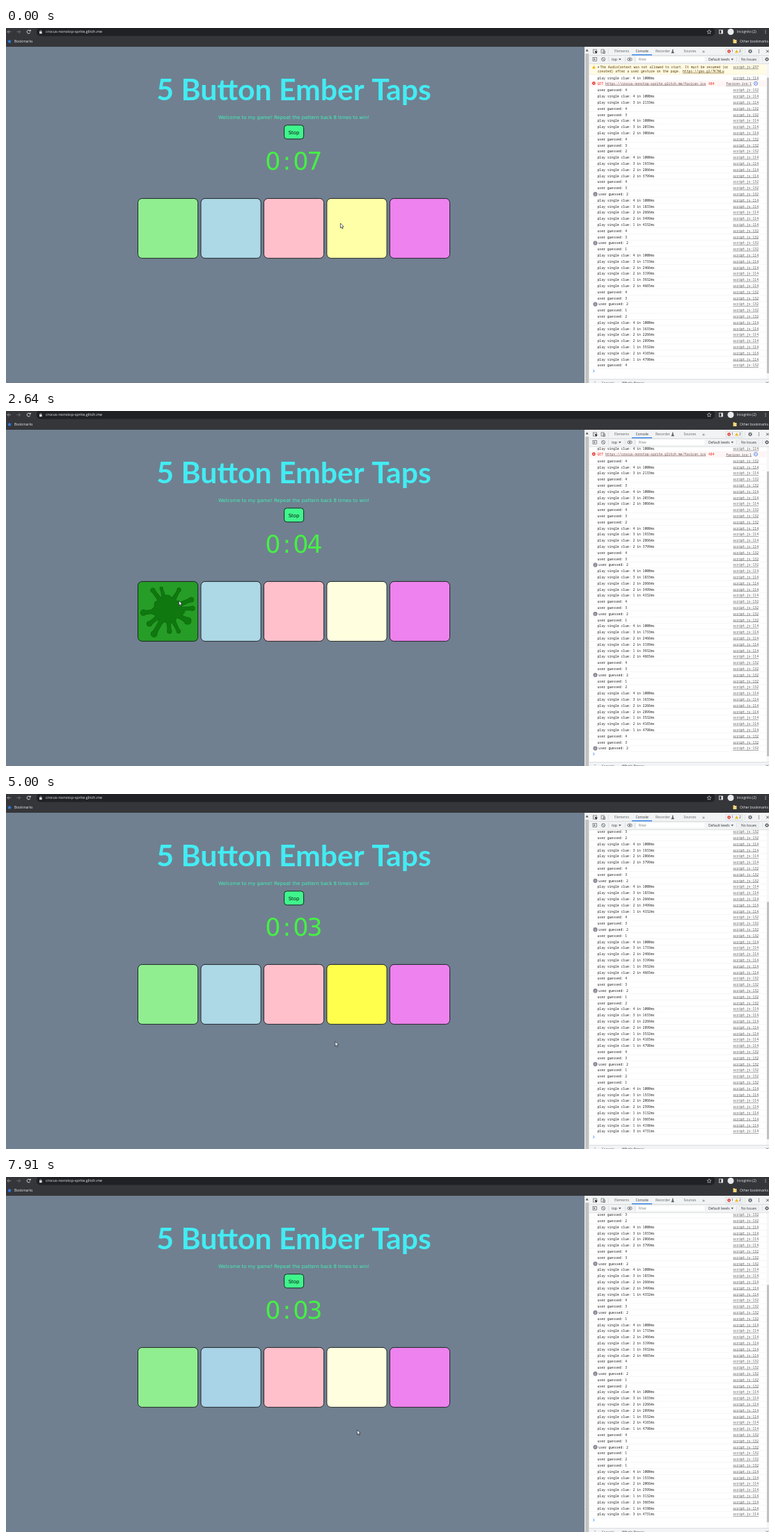
Animation, 1096 px wide and 511 px high, one loop 8000 ms. Source, as an HTML page with a canvas:

```html
<!DOCTYPE html>
<html lang="en">
<head>
<meta charset="utf-8">
<title>5 Button Ember Taps</title>
<style>
  html, body { margin: 0; width: 100%; height: 100%; overflow: hidden; background: #708090; }
  canvas { display: block; }
</style>
</head>
<body>
<canvas id="stage" width="1096" height="511"></canvas>
<script>
const ctx = document.getElementById('stage').getContext('2d');
const LOOP = 8000, FADE = 500, ROW = 8.8;
const UI = '"Open Sans", sans-serif';
const MONO = '"Noto Sans Mono", monospace';
const SANS = '"DejaVu Sans", sans-serif';
const GREY = '#5f6368', DARK = '#303134';

const rest = [[144, 238, 144], [173, 216, 230], [255, 192, 203], [255, 255, 224], [238, 130, 238]];
const lit = [[0, 128, 0], [0, 0, 255], [255, 0, 0], [255, 255, 0], [160, 0, 160]];
const pattern = [4, 3, 2, 2, 1, 2, 1, 3];

// button number, pressed at, released at
const presses = [[4, -420, -165], [3, 680, 865], [2, 1300, 1480], [2, 1800, 2010],
  [1, 2420, 2700], [2, 3020, 3210], [1, 3620, 3870]];
const cluesFrom = 3785;
const clues = pattern.map((b, i) => {
  const on = cluesFrom + 1000 + 533 * i;
  return [b, on, on + 200];
});

// time, x, y of the pointer tip
const path = [[0, 480, 281], [150, 480, 281], [620, 389, 277], [880, 389, 277], [1160, 327, 277],
  [2180, 325, 276], [2400, 248, 273], [2710, 248, 273], [2980, 322, 272], [3260, 320, 272],
  [3580, 239, 271], [4000, 239, 271], [4480, 353, 318], [5200, 500, 365],
  [5840, 502, 365], [7100, 503, 364], [7900, 504, 364], [8000, 504, 364]];

// angle in degrees, reach, bulb radius
const arms = [[-127, 35, 3], [-106, 32, 2], [-60, 33, 2.5], [-23, 37, 3.3], [-3, 36, 3], [29, 33, 5],
  [63, 35, 2.5], [85, 31, 3], [119, 40, 4.2], [142, 33, 3.5], [173, 35, 3.8]];

function bezier(s, a, b) {
  return 3 * (1 - s) * (1 - s) * s * a + 3 * (1 - s) * s * s * b + s * s * s;
}

function ease(x) {
  if (x <= 0) return 0;
  if (x >= 1) return 1;
  let lo = 0, hi = 1;
  for (let i = 0; i < 18; i++) {
    const mid = (lo + hi) / 2;
    if (bezier(mid, .25, .25) < x) lo = mid; else hi = mid;
  }
  return bezier(lo, .1, 1);
}

function glow(t, on, off) {
  if (t < on) return 0;
  if (t < off) return ease((t - on) / FADE);
  const peak = ease((off - on) / FADE);
  return peak * (1 - ease((t - off) / (FADE * peak)));
}

// Console history: every round prints its clues, then the guesses.
function clueRows(n) {
  return pattern.slice(0, n).map((b, i) =>
    ({ text: `play single clue: ${b} in ${1000 + i * (1333 - 100 * n)}ms`, link: 114, count: 1 }));
}

function addGuess(rows, b) {
  const text = 'user guessed: ' + b, last = rows[rows.length - 1];
  if (last.text === text) last.count++;
  else rows.push({ text, link: 132, count: 1 });
}

function logRows(t) {
  const rows = [];
  for (let n = 1; n < 7; n++) {
    rows.push(...clueRows(n));
    if (n === 1) rows.push({ error: true });
    pattern.slice(0, n).forEach(b => addGuess(rows, b));
  }
  rows.push(...clueRows(7));
  const done = presses.filter(p => p[2] <= t);
  done.forEach(p => addGuess(rows, p[0]));
  if (done.length === presses.length) rows.push(...clueRows(8));
  return rows;
}

function box(x, y, w, h, color) {
  ctx.fillStyle = color;
  ctx.fillRect(x, y, w, h);
}

function text(str, x, y, size, color, family = UI, align = 'left', weight = 400) {
  ctx.font = `${weight} ${size}px ${family}`;
  ctx.textAlign = align;
  ctx.fillStyle = color;
  ctx.fillText(str, x, y + size * .36);
}

function line(color, width, ...pts) {
  ctx.beginPath();
  for (let i = 0; i < pts.length; i += 2) ctx.lineTo(pts[i], pts[i + 1]);
  ctx.strokeStyle = color;
  ctx.lineWidth = width;
  ctx.stroke();
}

function poly(color, ...pts) {
  ctx.beginPath();
  for (let i = 0; i < pts.length; i += 2) ctx.lineTo(pts[i], pts[i + 1]);
  ctx.closePath();
  ctx.fillStyle = color;
  ctx.fill();
}

function disc(x, y, r, color) {
  ctx.beginPath();
  ctx.arc(x, y, r, 0, 7);
  ctx.fillStyle = color;
  ctx.fill();
}

function ring(x, y, r, color, width = .8, from = 0, to = 7) {
  ctx.beginPath();
  ctx.arc(x, y, r, from, to);
  ctx.strokeStyle = color;
  ctx.lineWidth = width;
  ctx.stroke();
}

function frameBox(x, y, w, h, color, width = .8) {
  ctx.strokeStyle = color;
  ctx.lineWidth = width;
  ctx.strokeRect(x, y, w, h);
}

function rounded(x, y, w, h, r, fill) {
  ctx.beginPath();
  ctx.roundRect(x, y, w, h, r);
  ctx.fillStyle = fill;
  ctx.fill();
  ctx.strokeStyle = '#14181b';
  ctx.lineWidth = .9;
  ctx.stroke();
}

function star(x, y, r, color, filled) {
  ctx.beginPath();
  for (let i = 0; i < 10; i++) {
    const a = i * Math.PI / 5 - Math.PI / 2, q = i % 2 ? r * .45 : r;
    ctx.lineTo(x + q * Math.cos(a), y + q * Math.sin(a));
  }
  ctx.closePath();
  ctx.fillStyle = ctx.strokeStyle = color;
  ctx.lineWidth = .6;
  if (filled) ctx.fill(); else ctx.stroke();
}

function dots(x, y, color) {
  for (const d of [-2, 0, 2]) disc(x, y + d, .6, color);
}

function cross(x, y, r, color) {
  line(color, .8, x - r, y - r, x + r, y + r);
  line(color, .8, x - r, y + r, x + r, y - r);
}

function gear(x, y) {
  ring(x, y, 1.7, GREY, 1.3);
  for (let a = 0; a < 6.2; a += Math.PI / 4)
    line(GREY, 1, x + 2 * Math.cos(a), y + 2 * Math.sin(a), x + 3 * Math.cos(a), y + 3 * Math.sin(a));
}

function warnSign(x, y) {
  poly('#f4b400', x, y - 2.3, x + 2.5, y + 2, x - 2.5, y + 2);
}

function errorSign(x, y) {
  disc(x, y, 2.4, '#e0322b');
  cross(x, y, .9, '#fff');
}

function arrow(x, y, dir, color) {
  line(color, .8, x - 2.6, y, x + 2.6, y);
  line(color, .8, x + dir * .2, y - 2.4, x + dir * 2.6, y, x + dir * .2, y + 2.4);
}

function drawBrowser() {
  box(0, 0, 1096, 27, '#35363a');
  ctx.beginPath();
  ctx.roundRect(44, -1, 974, 12.5, 5);
  ctx.fillStyle = '#202124';
  ctx.fill();
  arrow(4.5, 5.5, -1, '#9aa0a6');
  arrow(18, 5.5, 1, '#75787c');
  ring(32.5, 5.5, 2.4, '#e8eaed', .9, .4, 5.6);
  poly('#e8eaed', 33, 4.8, 35.6, 4.8, 35.6, 2.2);
  box(48, 5, 3.6, 3.2, '#dadce0');
  ring(49.8, 4.8, 1.2, '#dadce0', .7, Math.PI, 2 * Math.PI);
  text('crocus-nonstop-sprite.glitch.me', 57, 5.5, 5.5, '#e8eaed');
  star(1010, 5.7, 3.2, '#dadce0');
  frameBox(1024.5, 3, 5, 5, '#e8eaed');
  box(1027.4, 3, 2.2, 5, '#e8eaed');
  disc(1041, 5.5, 4.5, '#e8eaed');
  text('Incognito (2)', 1050, 5.5, 4.8, '#e8eaed');
  dots(1091, 5.5, '#e8eaed');
  star(5, 19.5, 3.2, '#2f80ed', true);
  text('Bookmarks', 12, 19.4, 5, '#e8eaed');
  box(1044.5, 17, 5, 5, '#f5d879');
  box(1044.5, 16.2, 2.4, 1, '#f5d879');
  text('Other bookmarks', 1054, 19.4, 5, '#e8eaed');
}

function drawSplat(cx, cy) {
  ctx.beginPath();
  for (let i = 0; i <= 60; i++) {
    const a = i * Math.PI / 30, r = 19.5 + 2.2 * Math.sin(a * 7) + 1.5 * Math.cos(a * 4);
    ctx.lineTo(cx + r * 1.08 * Math.cos(a), cy + r * .9 * Math.sin(a));
  }
  ctx.closePath();
  for (const [deg, reach, bulb] of arms) {
    const a = deg * Math.PI / 180, c = Math.cos(a), s = Math.sin(a);
    const at = (u, v) => [cx + u * c - v * s, cy + u * s + v * c];
    ctx.moveTo(...at(13, -5));
    ctx.quadraticCurveTo(...at(20, -1.4), ...at(reach, -bulb * .8));
    ctx.lineTo(...at(reach, bulb * .8));
    ctx.quadraticCurveTo(...at(20, 1.4), ...at(13, 5));
    ctx.closePath();
    const [bx, by] = at(reach, 0);
    ctx.moveTo(bx + bulb, by);
    ctx.arc(bx, by, bulb, 0, 2 * Math.PI);
  }
  ctx.strokeStyle = '#0a630c';
  ctx.lineWidth = 1.2;
  ctx.stroke();
  ctx.fillStyle = '#0f780f';
  ctx.fill();
}

function drawPage(t) {
  box(0, 27, 831, 484, '#708090');
  text('5 Button Ember Taps', 413.5, 88.2, 42.7, '#43ecf3', 'Lato, sans-serif', 'center', 700);
  text('Welcome to my game! Repeat the pattern back 8 times to win!', 413.5, 129, 6.86, '#43f0b8', SANS, 'center');
  rounded(399.6, 139.8, 28, 20, 4, '#40f58c');
  text('Stop', 413.6, 150, 7, '#0b1a12', SANS, 'center');

  const seconds = 7 - Math.min(4, Math.max(0, Math.floor((t + 500) / 1000)));
  [...('0:0' + seconds)].forEach((ch, i) => text(ch, 383.4 + i * 20, 191, 35, '#45f045', SANS, 'center'));

  const all = presses.concat(clues);
  rest.forEach((from, i) => {
    const k = Math.max(0, ...all.filter(p => p[0] === i + 1).map(p => glow(t, p[1], p[2])));
    const rgb = from.map((v, j) => Math.round(v + (lit[i][j] - v) * k));
    rounded(189.5 + 90.45 * i, 245.4, 86.2, 86, 6, `rgb(${rgb})`);
  });
  if (presses.some(p => p[0] === 1 && t >= p[1] && t < p[2])) drawSplat(232, 286);

  box(831, 27, 7, 484, '#f1f1f1');
  poly('#505050', 834.6, 30.5, 836.6, 33.4, 832.6, 33.4);
  box(832.2, 37, 5, 474, '#c1c1c1');
}

function drawTools() {
  box(838, 27, 258, 24, '#f1f3f4');
  box(838, 39, 258, .6, '#cacdd1');
  box(838, 51, 258, .6, '#cacdd1');
  frameBox(843.5, 31, 5, 5, GREY, .7);
  poly(DARK, 845.5, 32.5, 849.8, 34.2, 847.2, 37);
  frameBox(855, 31, 4, 5, GREY, .7);
  frameBox(858, 33, 2.4, 3.4, GREY, .7);
  box(864.8, 30, .5, 7, '#cacdd1');
  text('Elements', 874, 33.6, 4.9, GREY);
  text('Console', 904.5, 33.6, 4.9, DARK);
  text('Recorder', 933, 33.6, 4.9, GREY);
  text('Sources', 973.5, 33.6, 4.9, GREY);
  text('»', 1000, 33, 8, GREY);
  box(899, 38, 29, 1.2, '#1a73e8');
  poly(GREY, 957, 30.8, 958.4, 30.8, 958.4, 33, 960, 36.2, 955.4, 36.2, 957, 33);
  frameBox(1034, 29.6, 24, 8, '#d0d3d7', .6);
  errorSign(1038.6, 33.6);
  text('1', 1042, 33.6, 4.9, DARK);
  warnSign(1049.5, 33.6);
  text('2', 1053, 33.6, 4.9, DARK);
  box(1061.5, 30, .5, 7, '#cacdd1');
  gear(1069, 33.5);
  dots(1081.5, 33.5, DARK);
  cross(1094, 33.5, 1.9, DARK);

  frameBox(843, 42.5, 5.6, 5, GREY, .7);
  poly(GREY, 844.5, 43.5, 847, 45, 844.5, 46.5);
  ring(858, 45, 2.5, GREY);
  line(GREY, .8, 856.3, 43.3, 859.7, 46.7);
  for (const x of [865, 889, 903, 1049, 1086]) box(x, 41.5, .5, 7, '#cacdd1');
  text('top', 870, 45, 4.9, DARK);
  poly(GREY, 880, 44, 883.6, 44, 881.8, 46.6);
  ctx.beginPath();
  ctx.ellipse(896, 45, 3.3, 2.1, 0, 0, 7);
  ctx.strokeStyle = GREY;
  ctx.lineWidth = .8;
  ctx.stroke();
  disc(896, 45, 1.1, GREY);
  box(905.5, 41.5, 98, 7.2, '#fff');
  text('Filter', 908.5, 45, 4.9, '#777');
  text('Default levels', 1009, 45, 4.9, DARK);
  poly(GREY, 1041.5, 44, 1045, 44, 1043.2, 46.6);
  frameBox(1053, 41, 28, 8, '#d5d8dc', .5);
  text('No Issues', 1056, 45, 4.9, DARK);
  gear(1093, 45);
}

function mono(str, x, y, color = '#222', align = 'left') {
  text(str, x, y, 4.74, color, MONO, align);
}

function link(str, x, y, color = '#505050', align = 'right') {
  mono(str, x, y, color, align);
  const w = ctx.measureText(str).width;
  box(align === 'right' ? x - w : x, y + 2.4, w, .5, color);
}

function drawErrorRow(y) {
  box(838, y - 4.2, 254, 8.8, '#fff5f5');
  errorSign(844.3, y - .2);
  mono('GET', 849.5, y, '#e8281c');
  link('https://crocus-nonstop-sprite.glitch.me/favicon.ico', 861, y, '#66504e', 'left');
  mono('404', 1009, y, '#e8281c');
  link('favicon.ico:1', 1071, y + .6);
  ring(1077, y, 2.6, '#3b7de0');
  line('#3b7de0', .7, 1075.6, y + .8, 1077, y - .8, 1078.4, y + .6);
}

function drawWarning(y) {
  box(838, y - 4.8, 254, 15, '#fffbe5');
  box(838, y + 10.2, 254, .5, '#f5e6b5');
  warnSign(844.4, y);
  poly('#6e6e6e', 850.2, y - 1.4, 852.6, y, 850.2, y + 1.4);
  mono('The AudioContext was not allowed to start. It must be resumed (or', 853.4, y, '#5c3c00');
  mono('created) after a user gesture on the page. ', 849.7, y + 6, '#5c3c00');
  link('https://goo.gl/7K7WLu', 972, y + 6, '#5c3c00', 'left');
  link('script.js:237', 1081, y);
}

function drawConsole(t) {
  box(838, 51, 258, 460, '#fff');
  ctx.save();
  ctx.beginPath();
  ctx.rect(838, 51.5, 258, 454);
  ctx.clip();
  const rows = logRows(t);
  const top = 485.6 - ROW * (rows.length - 1);
  drawWarning(top - 15.7);
  rows.forEach((row, i) => {
    const y = top + i * ROW;
    if (y < 45) return;
    if (row.error) return drawErrorRow(y - 1);
    box(838, y + 4.2, 254, .5, '#ededed');
    if (row.count > 1) {
      disc(846.5, y, 3.1, '#8d8796');
      text(row.count, 846.5, y, 4.2, '#fff', UI, 'center');
    }
    mono(row.text, row.count > 1 ? 851.3 : 849.5, y);
    link('script.js:' + row.link, 1081, y);
  });
  line('#367cf1', .9, 843.3, 492, 845.2, 493.7, 843.3, 495.4);
  ctx.restore();

  const hidden = 21 + ROW * (rows.length - 48);
  const thumb = 51.5 + 445 * hidden / (445 + hidden);
  box(1092.5, 51.5, 3.5, 454, '#f6f6f6');
  box(1093, thumb, 3, 497 - thumb, '#c1c1c1');

  box(838, 505.5, 258, 6, '#f1f3f4');
  box(838, 505.3, 258, .6, '#cacdd1');
  dots(846, 511.5, GREY);
  text('Console', 855.5, 511.4, 4.9, GREY);
  text("What's New", 885, 511.4, 4.9, DARK);
  cross(914.5, 511.5, 1.6, GREY);
  cross(1093.5, 511, 1.8, GREY);
}

function drawPointer(t) {
  const i = Math.max(1, path.findIndex(p => p[0] > t));
  const [t0, x0, y0] = path[i - 1], [t1, x1, y1] = path[i];
  const u = (t - t0) / (t1 - t0), k = u * u * (3 - 2 * u);
  ctx.save();
  ctx.translate(x0 + (x1 - x0) * k, y0 + (y1 - y0) * k);
  const shape = [.4, 0, .4, 6.9, 1.9, 5.5, 3, 8, 4.1, 7.5, 3, 5.1, 5.1, 5];
  poly('#fff', ...shape);
  line('#22262c', .7, ...shape, .4, 0);
  ctx.restore();
}

function draw(t) {
  drawPage(t);
  drawConsole(t);
  drawTools();
  drawBrowser();
  drawPointer(t);
}

const start = performance.now();
function tick() {
  draw((performance.now() - start) % LOOP);
  requestAnimationFrame(tick);
}
tick();
</script>
</body>
</html>
```
